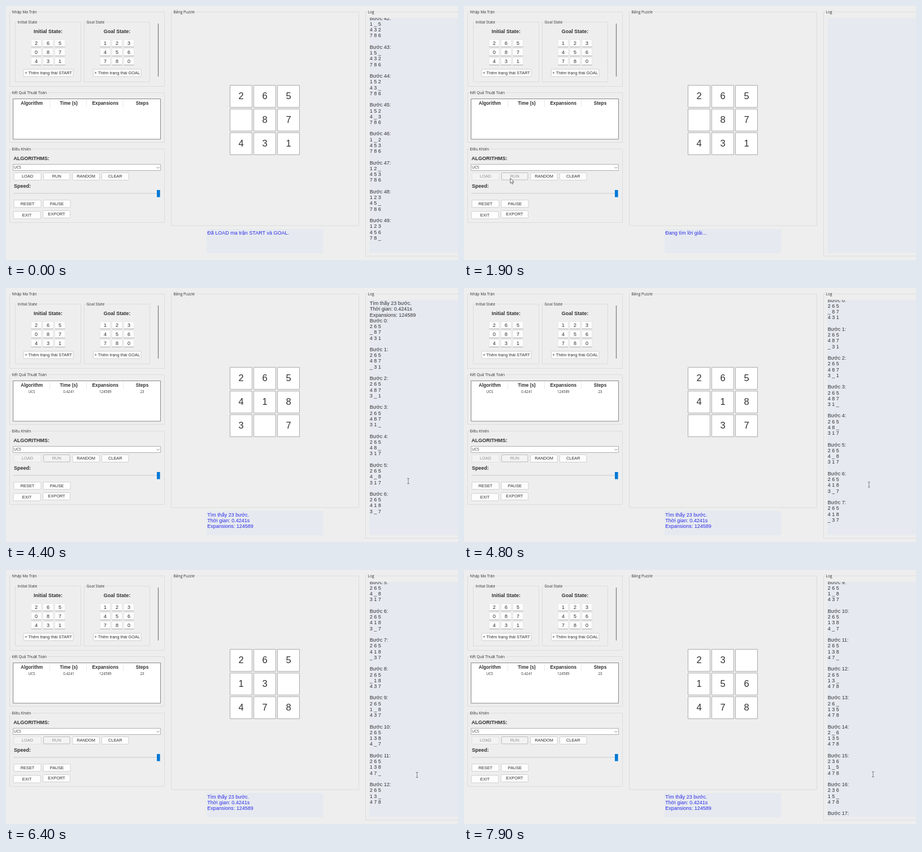
Write an HTML page with a canvas that moves like this. It is 800x450 px and loops after 8 s.

```html
<!DOCTYPE html>
<html lang="vi">
<head>
<meta charset="utf-8">
<style>
html, body { margin: 0; width: 100%; height: 100%; overflow: hidden; background: #eee; }
canvas { display: block; }
</style>
</head>
<body>
<canvas id="stage" width="800" height="450"></canvas>
<script>
const ctx = document.getElementById('stage').getContext('2d');
const LOOP = 8000, CLICK = 1350, CLEARED = 1600, SOLVED = 2090, STEP = 340, SCROLL_LAG = 60;
const SANS = '"Liberation Sans", Arial, sans-serif';
const UI = '"Open Sans", "Noto Sans", sans-serif';
const INK = '#303030', BG = '#eee', AREA = '#e6eaf0';

// Follows the blank tile through a string of moves and returns every board.
function walk(start, moves) {
  const shift = { U: -3, D: 3, L: -1, R: 1 }, boards = [start];
  for (const move of moves) {
    const cells = [...boards[boards.length - 1]];
    const from = cells.indexOf('_'), to = from + shift[move];
    [cells[from], cells[to]] = [cells[to], '_'];
    boards.push(cells.join(''));
  }
  return boards;
}
const oldRun = walk('1_5432786', 'RDLURDD');
const newRun = walk('265_87431', 'DRRULDLURDRUULDRU');
const summary = ['Tìm thấy 23 bước.', 'Thời gian: 0.4241s', 'Expansions: 124589'];

// Pointer path: time, x, y
const path = [
  [100, 672, 396], [900, 82, 305], [2300, 82, 305], [3100, 494, 296], [3250, 494, 296],
  [3800, 704, 340], [4400, 712, 342], [5500, 728, 363], [6500, 727.5, 363], [7900, 724, 362]
];

function text(str, x, y, size = 9, { align = 'left', color = INK, font = SANS, weight = '' } = {}) {
  ctx.font = `${weight} ${size}px ${font}`;
  ctx.textAlign = align;
  ctx.fillStyle = color;
  ctx.fillText(str, x, y + size * 0.33);
}
const centered = (str, x, y, size, style) => text(str, x, y, size, { align: 'center', ...style });

function box(x, y, w, h, fill, stroke, line = 1, radius = 0) {
  ctx.beginPath();
  ctx.roundRect(x, y, w, h, radius);
  if (fill) { ctx.fillStyle = fill; ctx.fill(); }
  if (stroke) { ctx.strokeStyle = stroke; ctx.lineWidth = line; ctx.stroke(); }
}

function line(points, color, width = 1) {
  ctx.beginPath();
  points.forEach(([x, y]) => ctx.lineTo(x, y));
  ctx.strokeStyle = color;
  ctx.lineWidth = width;
  ctx.stroke();
}

function panel(title, x, y, w, h) {
  box(x, y, w, h, null, '#dcdcdc');
  ctx.font = `6.7px ${UI}`;
  box(x + 3, y - 4, ctx.measureText(title).width + 3, 8, BG);
  text(title, x + 4, y, 6.7, { font: UI });
}

function button(label, x, y, w = 48, h = 13, state = '') {
  const off = state !== '';
  box(x, y, w, h, off ? '#f3f3f3' : '#fdfdfd', state === 'focus' ? '#bbb' : off ? '#e2e2e2' : '#d0d0d0', 1, 1);
  centered(label, x + w / 2, y + h / 2, 7.4, { color: off ? '#909090' : INK });
}

function matrix(title, digits, x, addLabel, addX, addW) {
  centered(title, x, 45.5, 9, { weight: 'bold' });
  [...digits].forEach((digit, i) => {
    const cx = x + (i % 3 - 1) * 21, cy = 66 + Math.floor(i / 3) * 16;
    box(cx - 9, cy - 6.5, 18, 13, '#fdfdfd', '#e2e2e2', 0.7, 1);
    line([[cx - 9, cy + 6.5], [cx + 9, cy + 6.5]], '#aaa');
    centered(digit, cx, cy, 9);
  });
  button(addLabel, addX, 112, addW);
}

function drawInputs() {
  panel('Nhập Ma Trận', 6.5, 10.5, 274, 132);
  panel('Initial State', 16.5, 28.5, 116, 106);
  panel('Goal State', 138.5, 28.5, 116, 106);
  matrix('Initial State:', '265087431', 74.5, '+ Thêm trạng thái START', 31, 88);
  matrix('Goal State:', '123456780', 196.5, '+ Thêm trạng thái GOAL', 154.5, 84.5);
  line([[269.5, 31], [269.5, 125]], '#777', 1.2);
}

function drawResults(solved) {
  const columns = [45.5, 111, 175.8, 241];
  panel('Kết Quả Thuật Toán', 6.5, 153.5, 274, 88);
  box(12.5, 164.5, 261, 71.5, '#fff', '#888');
  ['Algorithm', 'Time (s)', 'Expansions', 'Steps'].forEach((name, i) => {
    centered(name, columns[i], 172, 8.3, { weight: 'bold' });
    if (i) line([[12.5 + i * 65, 166], [12.5 + i * 65, 179]], '#e8e8e8');
  });
  if (solved) ['UCS', '0.4241', '124589', '23'].forEach((value, i) =>
    centered(value, columns[i], 184.3, 6.3, { font: UI }));
}

function drawControls(running) {
  panel('Điều Khiển', 6.5, 253.5, 274, 130);
  text('ALGORITHMS:', 13.3, 270, 9, { weight: 'bold' });
  box(12.5, 280.5, 261, 11, '#fff', '#b0b0b0');
  text('UCS', 14, 286, 6.7, { font: UI });
  line([[266.5, 285], [269, 287.5], [271.5, 285]], '#777', 0.9);
  button('LOAD', 14, 295.5, 48, 13, running ? 'off' : '');
  button('RUN', 66.5, 295.5, 46.5, 12.5, running ? 'focus' : '');
  button('RANDOM', 117.8, 295.5, 47.5);
  button('CLEAR', 169.5, 295.5, 47.5);
  text('Speed:', 14, 318.7, 9, { weight: 'bold' });
  line([[13, 332], [267, 332]], '#dcdcdc', 2);
  box(267, 326, 5.6, 12.6, '#0078d7');
  button('RESET', 14, 343.8);
  button('PAUSE', 66, 343.8);
  button('EXIT', 13, 364);
  button('EXPORT', 65.5, 362.5);
}

function drawPuzzle(board) {
  panel('Bảng Puzzle', 292.5, 10.5, 332, 378.5);
  [...board].forEach((digit, i) => {
    const x = 396.5 + (i % 3) * 42, y = 140.5 + Math.floor(i / 3) * 42;
    box(x, y, 39, 39, '#fff', '#aaa');
    if (digit !== '_') centered(digit, x + 19.5, y + 19.5, 16.5);
  });
}

function drawStatus(lines) {
  box(355, 395, 206.5, 43, AREA);
  lines.forEach((str, i) => text(str, 356.3, 402 + i * 10.25, 9, { color: '#2c2ce6' }));
}

function drawLog(boards, first, top, intro) {
  panel('Log', 636.5, 10.5, 180, 432.5);
  ctx.save();
  ctx.beginPath();
  ctx.rect(643, 21, 157, 416.5);
  ctx.clip();
  box(643, 21, 157, 417, AREA);
  const write = (str, y) => text(str, 643.8, y, 9);
  intro.forEach((str, i) => write(str, top - 30.7 + i * 10.25));
  boards.forEach((board, i) => {
    const y = top + i * 51.2;
    write(`Bước ${first + i}:`, y);
    for (let r = 0; r < 3; r++)
      write([...board.slice(r * 3, r * 3 + 3)].join(' '), y + (r + 1) * 10.25);
  });
  ctx.restore();
}

function drawPointer(t) {
  if (t < path[0][0]) return;
  let i = path.findIndex(key => key[0] > t);
  if (i < 0) i = path.length - 1;
  const [t0, x0, y0] = path[i - 1], [t1, x1, y1] = path[i];
  const p = Math.min(1, (t - t0) / (t1 - t0)), ease = p * p * (3 - 2 * p);
  const x = x0 + (x1 - x0) * ease, y = y0 + (y1 - y0) * ease;
  ctx.save();
  ctx.translate(x, y);
  if (x > 643) {
    line([[-2, -4.5], [2, -4.5]], '#666', 0.8);
    line([[0, -4.5], [0, 4.5]], '#666', 0.8);
    line([[-2, 4.5], [2, 4.5]], '#666', 0.8);
  } else {
    const arrow = new Path2D('M0 0V9L2 7.2L3.5 10.4L5 9.7L3.6 6.6H6.3Z');
    ctx.fillStyle = '#fff';
    ctx.fill(arrow);
    ctx.strokeStyle = '#444';
    ctx.lineWidth = 0.8;
    ctx.stroke(arrow);
  }
  ctx.restore();
}

function draw(t) {
  const running = t >= CLICK, solved = t >= SOLVED;
  const stepAt = time => Math.max(0, Math.min(17, Math.floor((time - SOLVED) / STEP)));
  const step = stepAt(t);

  box(0, 0, 800, 450, BG);
  drawInputs();
  drawResults(solved);
  drawControls(running);
  drawPuzzle(newRun[step]);
  drawStatus(solved ? summary : [running ? 'Đang tìm lời giải...' : 'Đã LOAD ma trận START và GOAL.']);
  if (solved) {
    const top = Math.min(57.8, 380.1 - stepAt(t - SCROLL_LAG) * 51.2);
    drawLog(newRun.slice(0, step + 1), 0, top, summary);
  } else {
    drawLog(t < CLEARED ? oldRun : [], 42, 21.7, []);
  }
  drawPointer(t);
}

const begin = performance.now();
function tick() {
  draw((performance.now() - begin) % LOOP);
  requestAnimationFrame(tick);
}
tick();
</script>
</body>
</html>
```
